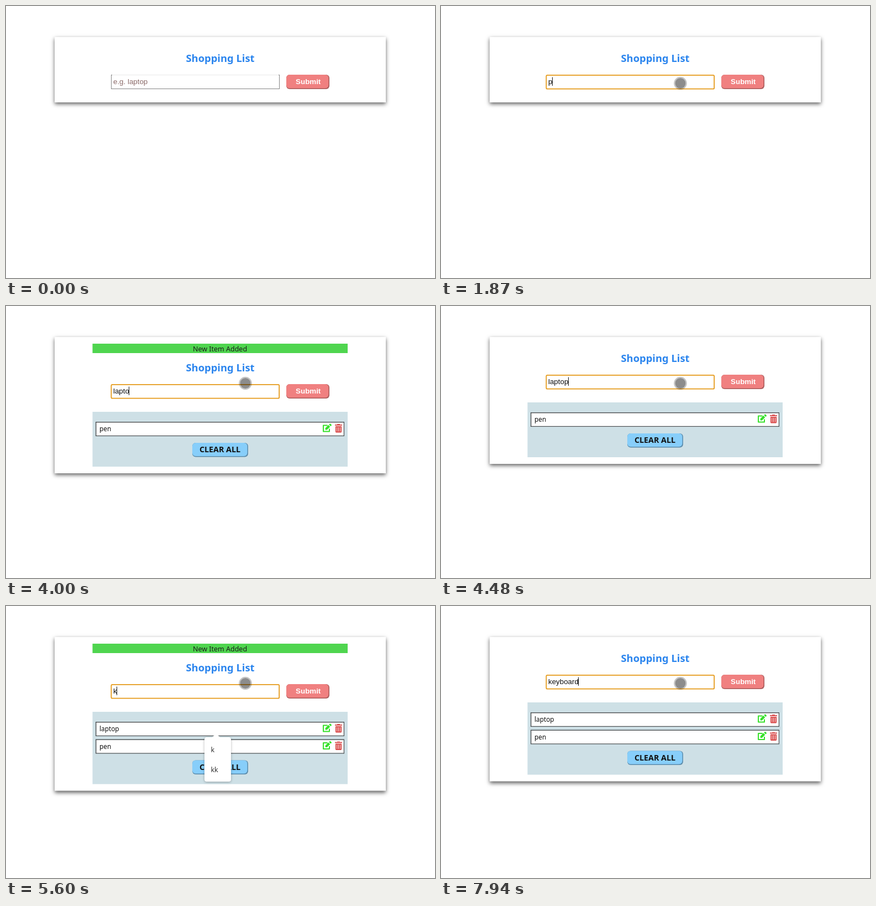
An HTML page with a canvas that plays this animation: 776 by 491 pixels, repeating every 8000 ms.

```html
<!DOCTYPE html>
<html lang="en">
<head>
<meta charset="utf-8">
<title>Shopping List</title>
<style>
html, body { margin: 0; width: 100%; height: 100%; overflow: hidden; background: #fff; }
canvas { display: block; width: 776px; height: 491px; }
</style>
</head>
<body>
<canvas id="stage" width="776" height="491"></canvas>
<script>
const ctx = document.getElementById('stage').getContext('2d');
const LOOP = 8000;
const UI = '"Noto Sans", "Open Sans", sans-serif';
const FORM = '"Liberation Sans", Arial, sans-serif';

// [time, content of the field]
const typing = [
  [0, ''], [1730, 'p'], [1940, 'pe'], [2080, 'pen'], [2490, ''],
  [2880, 'l'], [3010, 'la'], [3340, 'lap'], [3600, 'lapt'], [4000, 'lapto'], [4070, 'laptop'], [4610, ''],
  [5600, 'k'], [6390, 'ke'], [6530, 'key'],
  [7060, 'keyb'], [7210, 'keybo'], [7340, 'keyboa'], [7610, 'keyboar'], [7940, 'keyboard']
];
const lists = [[0, []], [2490, ['pen']], [4610, ['laptop', 'pen']]];
const menus = [
  [0, []], [1000, ['k', 'kk', 's', 'd', 'f', 'a']], [1800, []],
  [5600, ['k', 'kk']], [6460, []]
];
const notices = [[2490, 4480], [4610, 6600]];
const caretOff = [[0, 1000], [1530, 1730], [5070, 5600], [6060, 6390]];
const path = [
  [130, 669, 452], [270, 596, 390], [400, 485, 272], [530, 431, 231],
  [600, 429, 197], [730, 432, 141], [860, 433, 139.5]
];

const valueAt = (keys, t) => keys.filter(k => k[0] <= t).pop()[1];
const within = (spans, t) => spans.some(([a, b]) => t >= a && t < b);

function round(x, y, w, h, r, fill) {
  ctx.beginPath();
  ctx.roundRect(x, y, w, h, r);
  if (fill) {
    ctx.fillStyle = fill;
    ctx.fill();
  }
}

function rect(x, y, w, h, fill) {
  ctx.fillStyle = fill;
  ctx.fillRect(x, y, w, h);
}

function text(str, x, y, font, color, align = 'left') {
  ctx.font = font;
  ctx.fillStyle = color;
  ctx.textAlign = align;
  ctx.fillText(str, x, y);
}

function shadow(color, blur, dy) {
  ctx.shadowColor = color;
  ctx.shadowBlur = blur;
  ctx.shadowOffsetY = dy;
}

function button(x, y, w, h, face, edge) {
  round(x, y, w, h, 6, edge);
  round(x, y, w - 1.5, h - 1.5, 6, face);
}

function editIcon(x, y) {
  ctx.strokeStyle = ctx.fillStyle = '#36e02a';
  ctx.lineWidth = 2;
  ctx.lineJoin = 'round';
  ctx.beginPath();
  ctx.moveTo(x + 8.5, y + 3);
  ctx.lineTo(x + 1, y + 3);
  ctx.lineTo(x + 1, y + 14);
  ctx.lineTo(x + 12, y + 14);
  ctx.lineTo(x + 12, y + 9);
  ctx.stroke();
  // pencil
  ctx.save();
  ctx.translate(x + 4.6, y + 11);
  ctx.rotate(-Math.PI / 4);
  ctx.beginPath();
  ctx.moveTo(0, 0);
  ctx.lineTo(2.2, -2.2);
  ctx.lineTo(10, -2.2);
  ctx.lineTo(10, 2.2);
  ctx.lineTo(2.2, 2.2);
  ctx.fill();
  ctx.restore();
  ctx.save();
  ctx.translate(x + 13.4, y + 2.4);
  ctx.rotate(-Math.PI / 4);
  round(-1, -2.2, 3, 4.4, 1, '#36e02a');
  ctx.restore();
}

function trashIcon(x, y) {
  const red = '#d94a4a';
  rect(x + 4, y, 5, 1, red);
  rect(x, y + 1, 13, 1.8, red);
  round(x + 1, y + 4, 11, 11.5, [0, 0, 1.5, 1.5], red);
  for (let i = 0; i < 3; i++) rect(x + 3.2 + i * 2.9, y + 5.7, 0.9, 7.8, '#fff');
}

function drawItem(name, y) {
  rect(162, y, 450, 26, '#4b4f51');
  rect(163.4, y + 1.4, 447.4, 23.4, '#fff');
  text(name, 169, y + 17, '11.8px ' + UI, '#111');
  editIcon(573, y + 3.5);
  trashIcon(595, y + 4);
}

function drawPanel(items, y) {
  const h = 67.5 + 31.5 * items.length;
  rect(156.5, y, 461.5, h, '#cee0e6');
  items.forEach((name, i) => drawItem(name, y + 18 + i * 31.5));
  const by = y + 24.5 + 31.5 * items.length;
  button(337, by, 101, 25.5, '#87cefa', '#5c8cab');
  text('CLEAR ALL', 387, by + 17.3, '600 14.3px ' + UI, '#111', 'center');
}

function drawField(value, y, focused, caret) {
  if (focused) {
    round(190.4, y + 0.9, 303.8, 24.8, 2);
    ctx.strokeStyle = '#e59a1a';
    ctx.lineWidth = 1.8;
    ctx.stroke();
  } else {
    const gray = '#858585';
    rect(190, y, 1, 26, gray);
    rect(494, y, 1, 26, gray);
    rect(190, y + 25, 305, 1, gray);
    rect(190, y, 305, 1, '#e9e9e9');
    rect(190, y, 2, 1, gray);
    rect(493, y, 2, 1, gray);
  }
  const font = '13.333px ' + FORM;
  if (value) text(value, 194, y + 17, font, '#111');
  else text('e.g. laptop', 194, y + 17, font, focused ? '#757575' : '#8c6c6a');
  if (caret) {
    ctx.font = font;
    rect(194 + Math.floor(ctx.measureText(value).width), y + 4.5, 1, 15.5, '#111');
  }
}

function drawMenu(options, y) {
  const h = options.length * 36 + 8;
  shadow('rgba(0,0,0,.3)', 4, 1);
  round(359, y, 48, h, 4, '#fff');
  shadow('transparent', 0, 0);
  ctx.beginPath();
  ctx.moveTo(372, y + 1);
  ctx.lineTo(380, y - 7);
  ctx.lineTo(388, y + 1);
  ctx.fill();
  options.forEach((o, i) => text(o, 370.5, y + 27 + i * 36, '12.4px ' + UI, '#333'));
}

function drawPointer(t) {
  if (t < path[0][0]) return;
  const step = 66.6;
  const p = path[0][0] + Math.floor((t - path[0][0]) / step) * step;
  let [, x, y] = path[path.length - 1];
  for (let i = 1; i < path.length; i++) {
    const [a, ax, ay] = path[i - 1], [b, bx, by] = path[i];
    if (p < b) {
      const k = (p - a) / (b - a);
      x = ax + (bx - ax) * k;
      y = ay + (by - ay) * k;
      break;
    }
  }
  ctx.beginPath();
  ctx.arc(x, y, 10.6, 0, Math.PI * 2);
  ctx.strokeStyle = 'rgba(0,0,0,.23)';
  ctx.lineWidth = 2.4;
  ctx.stroke();
  ctx.beginPath();
  ctx.arc(x, y, 9.4, 0, Math.PI * 2);
  ctx.fillStyle = 'rgba(0,0,0,.45)';
  ctx.fill();
}

function draw(t) {
  const items = valueAt(lists, t);
  const menu = valueAt(menus, t);
  const notice = within(notices, t);
  const dy = notice ? 17 : 0;
  const bottom = 174 + dy + (items.length ? 79.5 + 31.5 * items.length : 0);

  rect(0, 0, 776, 491, '#fff');
  shadow('rgba(0,0,0,.62)', 7, 3);
  rect(88, 56, 599, bottom - 56, '#fff');
  shadow('transparent', 0, 0);

  if (notice) {
    rect(156.5, 68, 461.5, 17, '#4fd54f');
    text('New Item Added', 387, 81.5, '12.5px ' + UI, '#1b1b1b', 'center');
  }
  text('Shopping List', 387.5, 101 + dy, '700 18.4px ' + UI, '#2b85ee', 'center');
  drawField(valueAt(typing, t), 124 + dy, t >= 1000, !within(caretOff, t));
  button(507, 124 + dy, 78, 26, '#f08080', '#a95c5c');
  text('Submit', 546.7, 141 + dy, '700 13.333px ' + FORM, '#fff', 'center');
  if (items.length) drawPanel(items, 174 + dy);
  if (menu.length) drawMenu(menu, t < 2000 ? 216 : 237);
  drawPointer(t);
}

const start = performance.now();
function frame() {
  draw((performance.now() - start) % LOOP);
  requestAnimationFrame(frame);
}
frame();
</script>
</body>
</html>
```
